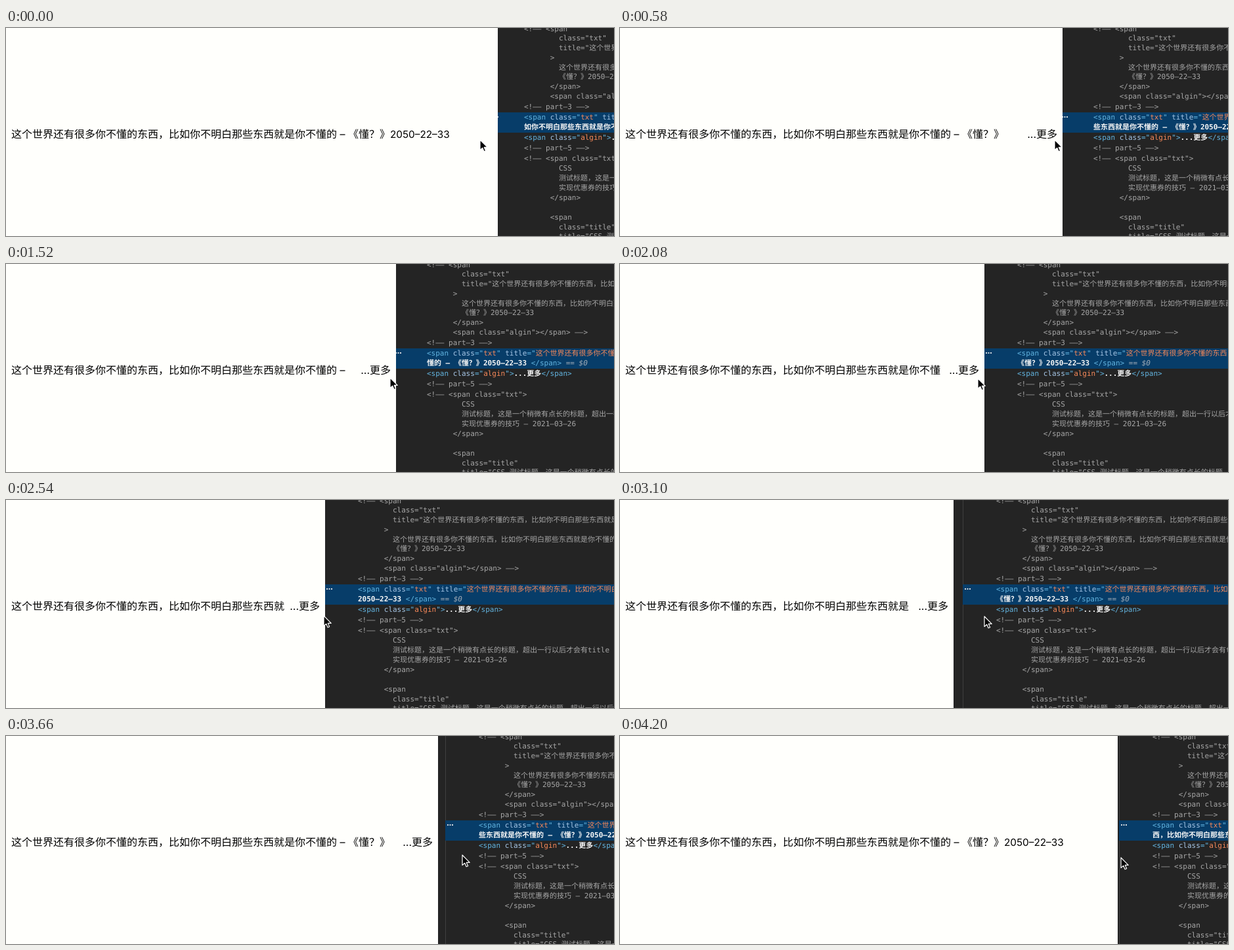
An HTML page that plays this animation: 926 px wide and 318 px high, repeating every 4220 ms.

```html
<!DOCTYPE html>
<html lang="zh-CN">
<head>
<meta charset="utf-8">
<title>Text truncation</title>
<style>
html, body { margin: 0; width: 100%; height: 100%; overflow: hidden; }
body { position: relative; background: #242424; text-rendering: geometricPrecision; text-spacing-trim: space-all; }
div { position: absolute; }
.nb { white-space: nowrap; }
#stage { left: 0; top: 0; width: 926px; height: 318px; overflow: hidden; background: #242424; }
#panel {
  top: 0; left: 0; width: 1400px; height: 318px;
  font: 11px/15px "DejaVu Sans Mono", "Noto Sans CJK SC", "Noto Sans CJK", monospace;
  color: #a6a6a6;
}
#rule { left: 0; top: 0; width: 1px; height: 318px; background: #3f3f3f; }
.row { white-space: pre; }
#mark { left: 0; top: 129px; width: 100%; height: 31px; background: #073d69; }
#dots { left: 3px; top: 6px; width: 2px; height: 2px; color: #d8dce0; background: currentColor; box-shadow: 3.5px 0, 7px 0; }
#node { left: 51px; top: 0; }
.tag { color: #62b4e0; }
.attr { color: #a6c6e6; }
.val { color: #f7895a; }
.text { color: #f6f6f6; font-weight: 600; }
.ref { color: #a3adb8; font-style: italic; }
#page {
  left: 0; top: 0; height: 318px; overflow: hidden; background: #fffffc; color: #000;
  font: 16px/24px Inter, "Noto Sans CJK SC", "Noto Sans CJK", sans-serif;
}
#line { left: 8px; top: 149px; height: 24px; overflow: hidden; font-family: "Noto Sans CJK SC", "Noto Sans CJK", sans-serif; }
#line span { font-family: Inter, sans-serif; line-height: 1; }
#line .nb { font-size: 15.3px; }
#more { right: 8px; top: 150px; white-space: nowrap; }
#cursor { position: absolute; left: -2px; top: -2px; overflow: visible; }
</style>
</head>
<body>
<div id="stage">
  <div id="panel">
    <div id="rule"></div>
    <div id="mark"><div id="dots"></div><div id="node"></div></div>
  </div>
  <div id="page"><div id="line"></div><div id="more">...更多</div></div>
  <svg id="cursor" width="16" height="22">
    <path d="M0 0V15.6L3.7 12.3L6.1 17.8L8.6 16.7L6.3 11.4H11.2Z" fill="#000" stroke="#fff" stroke-width="1.2" stroke-linejoin="round"/>
  </svg>
</div>
<script>
const $ = id => document.getElementById(id);
const [panel, node, page, line, more, cursor] =
  ["panel", "node", "page", "line", "more", "cursor"].map($);

const lead = "这个世界还有很多你不懂的东西，比如你不明白那些东西就是你不懂的";
const date = "2050-22-33";
const longTitle = "测试标题，这是一个稍微有点长的标题，超出一行以后才会有";
const sentence = `${lead}<span> - </span>《懂？》<span class="nb">${date}</span>`;
const paint = (cls, s) => `<span class="${cls}">${s}</span>`;
const attr = (name, value) => " " + paint("attr", name) + paint("tag", '="') + paint("val", value) + paint("tag", '"');
const open = attrs => paint("tag", "&lt;span") + attrs + paint("tag", "&gt;");
const close = paint("tag", "&lt;/span&gt;");
const esc = s => s.replace(/</g, "&lt;").replace(/>/g, "&gt;");
// Hyphens are drawn wide throughout.
const fill = (el, html) => { el.innerHTML = html.replace(/-/g, "–"); };

// centre y, indent in characters, markup
const rows = [
  [1, 0, esc("<!-- <span")],
  [15, 8, 'class="txt"'],
  [30, 8, `title="${lead} - 《懂？》${date}"`],
  [45, 6, "&gt;"],
  [60, 8, lead + " -"],
  [74, 8, "《懂？》" + date],
  [89, 6, esc("</span>")],
  [104, 6, esc('<span class="algin"></span> -->')],
  [120, 0, esc("<!-- part-3 -->")],
  [167, 0, open(attr("class", "algin")) + paint("text", "...更多") + close],
  [183, 0, esc("<!-- part-5 -->")],
  [199, 0, esc('<!-- <span class="txt">')],
  [214, 8, "CSS"],
  [229, 8, longTitle + "title 提示"],
  [244, 8, "实现优惠券的技巧 - 2021-03-26"],
  [259, 6, esc("</span>")],
  [289, 6, esc("<span")],
  [304, 8, 'class="title"'],
  [318, 8, `title="CSS ${longTitle}"`]
];
for (const [y, indent, html] of rows) {
  const row = document.createElement("div");
  row.className = "row";
  row.style.top = y - 7 + "px";
  row.style.left = 51 + indent * 6.62 + "px";
  fill(row, html);
  panel.append(row);
}
fill(node, open(attr("class", "txt") + attr("title", sentence)) +
  paint("text", sentence) + " " + close + paint("ref", " == $0"));
fill(line, sentence);

// step, panel x, page width, cursor x, cursor y, speed per step
const keys = [
  [0, 738, 749, 722, 171, -11],
  [13, 670, 674, 662, 171, -4],
  [32, 590, 594, 585, 174, -4],
  [44, 554, 555, 545, 175, -3],
  [58, 478, 479, 477, 177, 0],
  [67, 522, 508, 555, 178, 14],
  [79, 669, 658, 695, 182, 11],
  [90, 760, 758, 763, 186, 2]
];
const LOOP = 4220, WRAP_RIGHT = 1618, FITS = 693;

// Steps last 20, 100 and 20 ms in turn.
function stepAt(t) {
  const phase = t % 140;
  return Math.floor(t / 140) * 3 + (phase < 20 ? 0 : phase < 120 ? 1 : 2);
}

function hermite(a, b, va, vb, u, span) {
  const w = 1 - u;
  return a * w * w * (1 + 2 * u) + b * u * u * (3 - 2 * u) + span * u * w * (va * w - vb * u);
}

function pose(n) {
  let i = 0;
  while (i < keys.length - 2 && n >= keys[i + 1][0]) i++;
  const a = keys[i], b = keys[i + 1], span = b[0] - a[0], u = (n - a[0]) / span;
  const at = k => Math.round(hermite(a[k], b[k], a[5], b[5], u, span));
  return { panelX: at(1), pageW: at(2), x: at(3), y: Math.round(a[4] + (b[4] - a[4]) * u) };
}

function draw(n) {
  const p = pose(n), fits = p.pageW >= FITS;
  panel.style.left = p.panelX + "px";
  node.style.width = WRAP_RIGHT - p.panelX - 51 + "px";
  page.style.width = p.pageW + "px";
  line.style.width = p.pageW - 16 - (fits ? 0 : 45) + "px";
  line.style.whiteSpace = fits ? "nowrap" : "normal";
  more.style.visibility = fits ? "hidden" : "visible";
  cursor.style.transform = `translate(${p.x + 2}px, ${p.y + 2}px)`;
}

const start = performance.now();
function tick() {
  draw(stepAt((performance.now() - start) % LOOP));
  requestAnimationFrame(tick);
}
tick();
</script>
</body>
</html>
```
